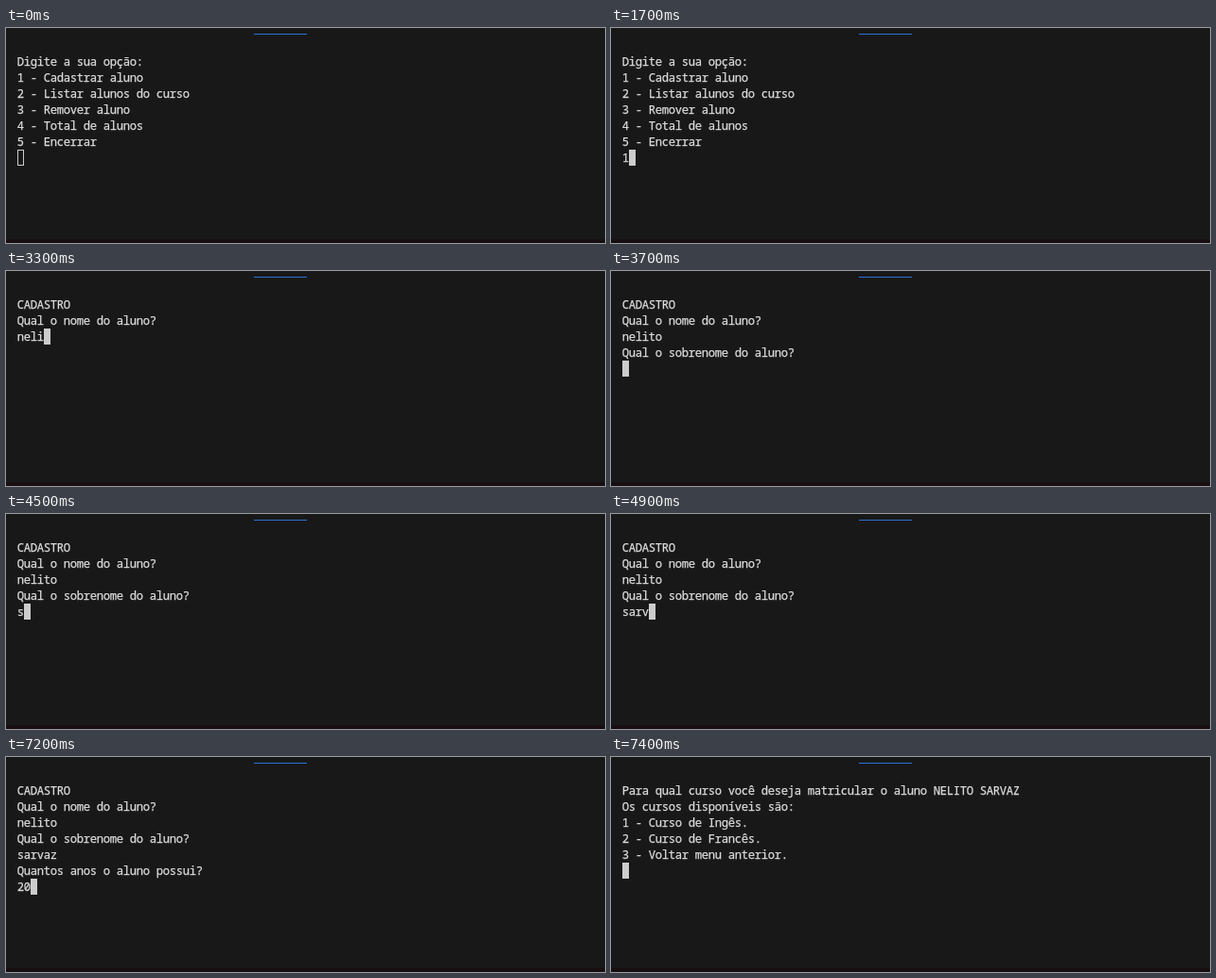
These frames come from a looping animation (633 px wide and 228 px high, 8000 ms). An HTML page with a canvas:

```html
<!DOCTYPE html>
<html lang="pt">
<head>
<meta charset="utf-8">
<title>Terminal</title>
<style>
html, body { margin: 0; width: 100%; height: 100%; overflow: hidden; background: #181818; }
canvas { display: block; }
</style>
</head>
<body>
<canvas id="stage" width="633" height="228"></canvas>
<script>
const ctx = document.getElementById('stage').getContext('2d', { alpha: false });
const LOOP = 8000, LEFT = 12, TOP = 27, CELL = 7, ROW = 17;
const FG = '#cccccc', BG = '#181818', INK = '#dcdcdc';

const first = 'nelito', last = 'sarvaz', age = '20';
const fullName = `${first} ${last}`.toUpperCase();
const menu = [
  'Digite a sua opção:',
  '1 - Cadastrar aluno',
  '2 - Listar alunos do curso',
  '3 - Remover aluno',
  '4 - Total de alunos',
  '5 - Encerrar'
];
const askFirst = ['CADASTRO', 'Qual o nome do aluno?'];
const askLast = [...askFirst, first, 'Qual o sobrenome do aluno?'];
const askAge = [...askLast, last, 'Quantos anos o aluno possui?'];
const courses = [
  `Para qual curso você deseja matricular o aluno ${fullName}`,
  'Os cursos disponíveis são:',
  '1 - Curso de Ingês.',
  '2 - Curso de Francês.',
  '3 - Voltar menu anterior.'
];

// Each screen: start time, fixed lines, typed answer, key press times
const screens = [
  { at: 0, lines: menu, answer: '1', keys: [1700] },
  { at: 1900, lines: askFirst, answer: first, keys: [3000, 3000, 3100, 3300, 3400, 3500] },
  { at: 3700, lines: askLast, answer: last, keys: [4500, 4600, 4800, 4900, 5600, 5700] },
  { at: 5900, lines: askAge, answer: age, keys: [7000, 7200] },
  { at: 7300, lines: [...askAge, age], answer: '', keys: [] },
  { at: 7400, lines: courses, answer: '', keys: [] }
];

function rect(color, x, y, w, h) {
  ctx.fillStyle = color;
  ctx.fillRect(x, y, w, h);
}

// A hairline stroke gives the glyphs their sturdier stems
function write(text, row) {
  const y = TOP + row * ROW + 13;
  ctx.fillStyle = ctx.strokeStyle = INK;
  ctx.lineWidth = 0.25;
  [...text].forEach((ch, i) => {
    const x = LEFT + (i + 0.5) * CELL;
    ctx.fillText(ch, x, y);
    ctx.strokeText(ch, x, y);
  });
}

function cursor(col, row, focused) {
  const x = LEFT + col * CELL, y = TOP + row * ROW;
  rect(FG, x, y, CELL, ROW);
  if (!focused) rect(BG, x + 1, y + 1, CELL - 2, ROW - 2);
}

function draw(t) {
  rect(BG, 0, 0, 633, 228);
  rect('#2a73d3', 262, 6, 56, 1);
  rect('#180e11', 0, 224, 633, 4);
  ctx.font = '12.2px "Noto Sans Mono", "DejaVu Sans Mono", monospace';
  ctx.textAlign = 'center';

  const screen = screens.filter(s => s.at <= t).pop();
  const typed = screen.answer.slice(0, screen.keys.filter(k => k <= t).length);
  const row = screen.lines.length;
  screen.lines.forEach(write);
  write(typed, row);
  cursor(typed.length, row, t >= 700);
}

const start = performance.now();
function tick() {
  draw((performance.now() - start) % LOOP);
  requestAnimationFrame(tick);
}
tick();
</script>
</body>
</html>
```
